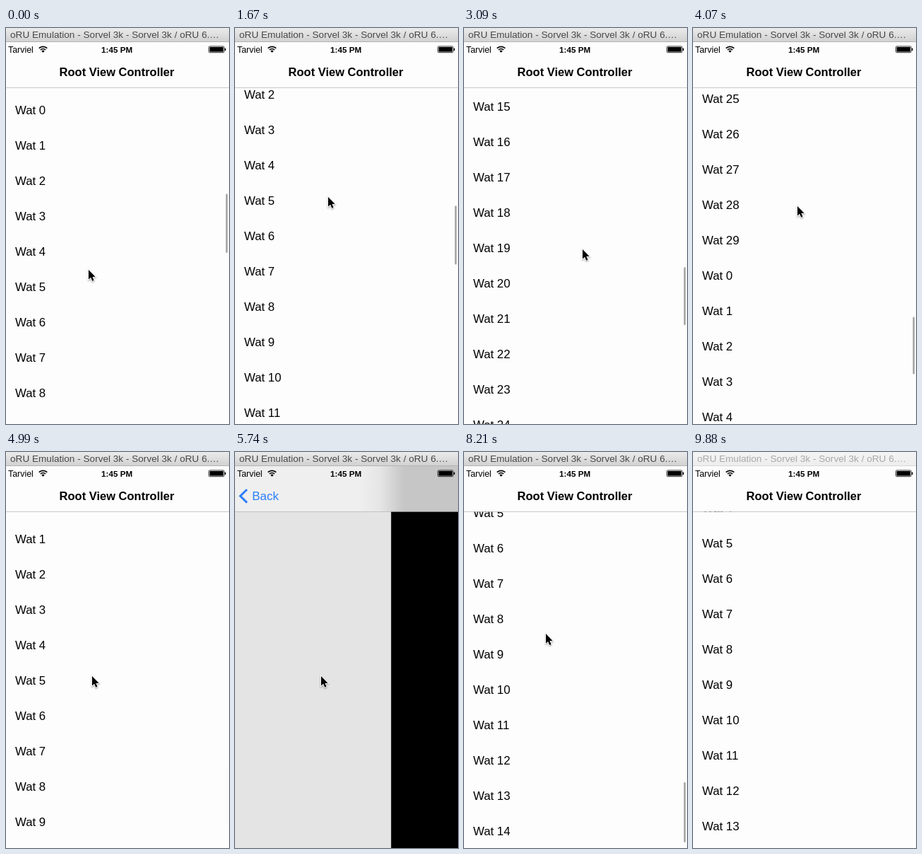
Animation, 316 px wide and 560 px high, one loop 9.9 s. Source, as an HTML page with a canvas:

```html
<!DOCTYPE html>
<html lang="en">
<head>
<meta charset="utf-8">
<title>Endless table</title>
<style>
html, body { margin: 0; width: 316px; height: 560px; overflow: hidden; background: #fff; }
canvas { display: block; }
</style>
</head>
<body>
<canvas id="stage" width="316" height="560"></canvas>
<script>
const g = document.getElementById('stage').getContext('2d');
const W = 316, H = 560, NAV = 84, LOOP = 9900;
const SANS = '"Liberation Sans", Arial, sans-serif';
const PUSH = 5280, PUSHED = 5800, POP = 6590, POPPED = 7110;

// [time, scroll offset]
const scrollKeys = [[0, 0], [900, 70], [1670, 122], [2300, 410], [3090, 755],
  [4070, 1266], [4690, 1543], [LOOP, 1543]];
const returnKeys = [[0, 1823], [8040, 1823], [8380, 1737], [LOOP, 1737]];
// [time, x, y] of the pointer tip
const pointerKeys = [[0, 117, 342], [900, 122, 272], [1670, 132, 239], [2300, 150, 262],
  [3090, 168, 313], [3550, 158, 290], [4070, 148, 252], [4690, 122, 317], [5750, 122, 317],
  [6250, 59, 79], [7740, 59, 79], [8040, 116, 200], [8380, 116, 287], [8800, 116, 287],
  [9090, 151, 416], [9270, 151, 416], [9500, 256, 565], [LOOP, 256, 565]];

const clamp = x => Math.min(1, Math.max(0, x));
const lerp = (a, b, u) => a + (b - a) * u;
const gray = v => `rgb(${v},${v},${v})`;

// Monotone cubic through the keys
function track(keys, t, c = 1) {
  let i = 0;
  while (i < keys.length - 2 && keys[i + 1][0] <= t) i++;
  const slope = k => keys[k + 1] && keys[k]
    ? (keys[k + 1][c] - keys[k][c]) / (keys[k + 1][0] - keys[k][0]) : 0;
  const tangent = k => {
    const a = slope(k - 1), b = slope(k);
    return a * b > 0 ? 2 * a * b / (a + b) : 0;
  };
  const span = keys[i + 1][0] - keys[i][0], u = clamp((t - keys[i][0]) / span), v = 1 - u;
  return v * v * (1 + 2 * u) * keys[i][c] + u * u * (3 - 2 * u) * keys[i + 1][c]
    + span * u * v * (v * tangent(i) - u * tangent(i + 1));
}

// Remaining part of a critically damped spring
function spring(ms) {
  const x = Math.max(0, ms) * 0.01826;
  return (1 + x) * Math.exp(-x);
}

function text(str, x, y, size, color = '#000', weight = '') {
  g.font = `${weight} ${size}px ${SANS}`;
  g.fillStyle = color;
  g.fillText(str, x, y);
}

function rect(x, y, w, h, color) {
  g.fillStyle = color;
  g.fillRect(x, y, w, h);
}

function table(s, pushed) {
  g.save();
  g.beginPath();
  g.rect(0, NAV, W, H - NAV);
  g.clip();
  g.translate(-95 * pushed, 0);
  rect(0, NAV, W, H - NAV, '#fdfdfd');
  const first = Math.floor(s / 50) - 1;
  for (let i = first; i < first + 12; i++)
    text('Wat ' + (i + 30) % 30, 13, 122 + i * 50 - s, 16.8);
  rect(0, NAV, W, H - NAV, `rgba(0,0,0,${0.1 * pushed})`);
  g.restore();
}

function thumb(t, s) {
  const alpha = t < 5200 ? 1 - clamp((t - 4800) / 200)
    : t < 7500 ? (t >= POPPED ? 1 - clamp((t - 7250) / 200) : 0)
    : t < 7770 ? 0 : 1 - clamp((t - 8780) / 200);
  if (!alpha) return;
  const late = t > PUSH;
  const y = late ? 473 - 0.14 * (1823 - s) : 234.5 + 0.1374 * s;
  const h = late ? 85 : 83.5 - 0.002 * s;
  g.globalAlpha = alpha;
  g.fillStyle = '#a3a3a3';
  g.beginPath();
  g.roundRect(311.5, y, 2.5, h, 1.25);
  g.fill();
  g.globalAlpha = 1;
}

function navBar(pushed, shown, covered) {
  const light = gray(Math.round(lerp(239, 253, shown)));
  let fill = light;
  if (covered) fill = '#c6c6c6';
  else if (pushed > 0.01) {
    const edge = W - 95 * pushed;
    fill = g.createLinearGradient(edge - 45, 0, edge + 18, 0);
    fill.addColorStop(0, light);
    fill.addColorStop(0.45, gray(Math.round(lerp(253, 230, pushed))));
    fill.addColorStop(1, gray(Math.round(lerp(240, 198, pushed))));
  }
  rect(0, 20, W, 64, fill);
  rect(0, NAV, W, 0.7, '#b2b2b2');

  g.textAlign = 'center';
  g.globalAlpha = shown;
  text('Root View Controller', 157 - 52 * pushed, 68, 16.5, '#000', 'bold');
  g.textAlign = 'left';

  const blue = '#2a7ef8';
  g.globalAlpha = clamp(pushed * 1.6 - 0.6);
  text('Back', 24 + 85 * (1 - pushed), 68, 17, blue);
  g.strokeStyle = blue;
  g.lineWidth = 3;
  g.beginPath();
  g.moveTo(17, 53);
  g.lineTo(7.5, 62.3);
  g.lineTo(17, 71.6);
  g.stroke();
  g.globalAlpha = 1;
}

function statusBar() {
  text('Tarviel', 3, 34.5, 12.4);
  text('1:45 PM', 135, 34.5, 11.7, '#000', 'bold');
  g.strokeStyle = '#000';
  g.lineWidth = 1.7;
  for (const r of [8.2, 5]) {
    g.beginPath();
    g.arc(52.5, 34.5, r, -Math.PI * 0.75, -Math.PI * 0.25);
    g.stroke();
  }
  g.fillStyle = '#000';
  g.beginPath();
  g.moveTo(52.5, 34.8);
  g.arc(52.5, 34.8, 3, -Math.PI * 0.75, -Math.PI * 0.25);
  g.fill();
  g.lineWidth = 0.8;
  g.beginPath();
  g.roundRect(287.4, 25.9, 21.8, 8.8, 1.5);
  g.stroke();
  rect(288.6, 27, 19.4, 6.6, '#000');
  rect(310, 28.6, 1.4, 3.4, '#000');
}

function titleBar(active) {
  const shade = g.createLinearGradient(0, 0, 0, 20);
  shade.addColorStop(0, active ? '#ebebeb' : '#f4f4f4');
  shade.addColorStop(1, active ? '#d0d0d0' : '#ededed');
  rect(0, 0, W, 20, shade);
  rect(0, 19, W, 1, active ? '#b4b4b4' : '#d8d8d8');
  text('oRU Emulation - Sorvel 3k - Sorvel 3k / oRU 6.…', 6, 14, 13.6, active ? '#484848' : '#a8a8a8');
}

function pointer(x, y) {
  g.save();
  g.translate(x, y);
  g.beginPath();
  [[0, 0], [0, 13.6], [3.1, 10.8], [5.3, 15.8], [7.6, 14.8], [5.4, 10], [9.6, 9.8]]
    .forEach(p => g.lineTo(...p));
  g.closePath();
  g.shadowColor = 'rgba(0,0,0,.4)';
  g.shadowBlur = 2;
  g.shadowOffsetY = 1;
  g.strokeStyle = '#fff';
  g.lineWidth = 1.8;
  g.stroke();
  g.shadowColor = 'transparent';
  g.fillStyle = '#000';
  g.fill();
  g.restore();
}

function draw(t) {
  const pushed = t < POP ? 1 - spring(t - PUSH) : spring(t - POP);
  const shown = t < POP ? 1 - clamp((t - PUSH) / 300)
    : clamp((t - POP) / (POPPED - POP)) ** 1.5;
  const covered = t >= PUSHED && t < POP;
  const s = track(t < PUSHED ? scrollKeys : returnKeys, t);

  rect(0, 0, W, H, '#000');
  if (!covered) table(s, pushed);
  thumb(t, s);
  navBar(pushed, shown, covered);
  statusBar();
  titleBar(t < 9880);
  pointer(track(pointerKeys, t, 1), track(pointerKeys, t, 2));
}

function tick() {
  draw(performance.now() % LOOP);
  requestAnimationFrame(tick);
}
tick();
</script>
</body>
</html>
```
